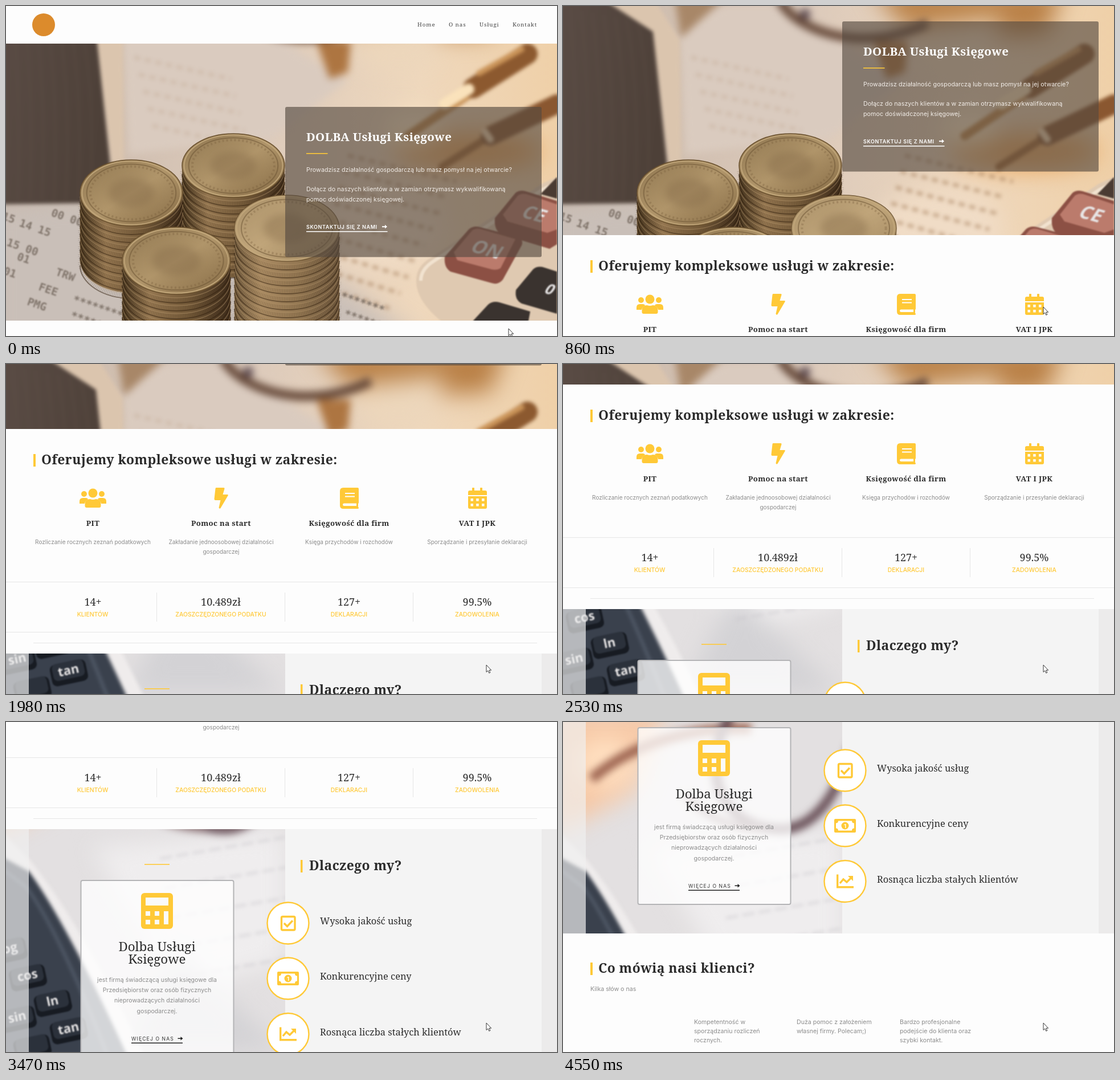
These frames come from a looping animation (967 px wide and 579 px high, 4790 ms). An HTML page:

```html
<!DOCTYPE html>
<html lang="pl">
<head>
<meta charset="utf-8">
<title>Usługi Księgowe</title>
<style>
  html, body { margin: 0; width: 100%; height: 100%; overflow: hidden; background: #fdfdfd; }
  #stage { position: relative; width: 967px; height: 579px; overflow: hidden; --s: 0; }
  #stage svg { position: absolute; left: 0; top: 0; display: block; }
  #page { position: absolute; inset: 0 0 auto; height: 1640px; transform: translateY(calc(var(--s) * -1px)); }
  #why { position: absolute; top: 946px; width: 967px; height: 451px; overflow: hidden; background: #e6e3e3; }
  #why svg { transform: translateY(calc(var(--s) * 1px - 946px)); will-change: transform; }
  #hero { will-change: transform; }
  .b1 { filter: blur(1px); }
  .b3 { filter: blur(3px); }
  .b7 { filter: blur(7px); }
  .b20 { filter: blur(20px); }
  text { font-family: Inter, "Open Sans", sans-serif; font-size: 10.6px; fill: #8c8c8c; }
  .serif, .nav, .h2, .h3, .num, .why { font-family: "Noto Serif", "Liberation Serif", serif; fill: #2b2b2b; }
  .nav { font-size: 9.8px; letter-spacing: .9px; fill: #444; }
  .h1 { font: bold 20.5px "Noto Serif", serif; letter-spacing: .4px; fill: #fff; }
  .h2 { font-size: 22.9px; font-weight: bold; letter-spacing: .45px; }
  .h3 { font-size: 13.2px; font-weight: bold; letter-spacing: .35px; }
  .num { font-size: 18px; }
  .why { font-size: 16.4px; }
  .name { font-size: 22.4px; }
  .lead { font-size: 10.7px; letter-spacing: .07px; fill: #f1ece7; }
  .desc { font-size: 10px; }
  .label { font-size: 10.4px; font-weight: 500; fill: #ffc937; }
  .cta { font-size: 9px; font-weight: 600; letter-spacing: .6px; fill: #fff; }
  .more { font-size: 8.6px; letter-spacing: 1.1px; fill: #333; }
  .mid { text-anchor: middle; }
  .y { fill: #ffc937; }
  .w { fill: #fdfdfd; }
  .ys { fill: none; stroke: #ffc937; stroke-width: 3.4; }
  .rule { stroke: #e6e6e6; }
  .print text { font: bold 19px "DejaVu Sans Mono", monospace; fill: #75695f; }
  .key { font: bold 22px "Open Sans", sans-serif; fill: #e8e6e6; text-anchor: middle; }
</style>
</head>
<body>
<div id="stage">

<svg id="hero" width="967" height="579" viewBox="0 0 967 579">
  <defs>
    <linearGradient id="desk">
      <stop offset="0" stop-color="#c8b7a9"/><stop offset=".45" stop-color="#dccabb"/>
      <stop offset=".75" stop-color="#efd8bd"/><stop offset="1" stop-color="#efd0a8"/>
    </linearGradient>
    <linearGradient id="side">
      <stop offset="0" stop-color="#46351f"/><stop offset=".25" stop-color="#947650"/>
      <stop offset=".6" stop-color="#745a39"/><stop offset="1" stop-color="#3d2b1a"/>
    </linearGradient>
    <linearGradient id="gold" x2="1" y2="1">
      <stop offset="0" stop-color="#8f7650"/><stop offset=".5" stop-color="#b0956a"/><stop offset="1" stop-color="#856a44"/>
    </linearGradient>
    <linearGradient id="wood" x2="1" y2=".3">
      <stop offset="0" stop-color="#5a4c45"/><stop offset="1" stop-color="#4d4038"/>
    </linearGradient>
  </defs>
  <rect width="967" height="579" fill="url(#desk)"/>
  <g class="b20">
    <path d="M-30 350L210 330 560 470 760 609H-30Z" fill="#c9bfb8"/>
    <path d="M540 -30H880L850 50 620 60Z" fill="#b98046"/>
    <path d="M600 40L770 20 740 110 640 110Z" fill="#ecd6bb"/>
    <ellipse cx="810" cy="255" rx="130" ry="34" fill="#e9a760"/>
    <ellipse cx="715" cy="218" rx="50" ry="28" fill="#ffeccb"/>
    <ellipse cx="660" cy="390" rx="110" ry="70" fill="#f0dcc6"/>
  </g>
  <g class="b7">
    <path d="M205 52L275 0H400L520 85 600 130 470 230 215 260Z" fill="#dacbbf"/>
    <path d="M196 -15H285L207 56Z" fill="#a88768"/>
    <path d="M380 -10C420 55 540 80 640 30" fill="none" stroke="#664939" stroke-width="16"/>
    <path d="M545 62H605L600 116 568 128Z" fill="#ad7541"/>
    <circle cx="425" cy="14" r="9" fill="#55444c"/>
  </g>
  <g class="b3" fill="none" stroke-linecap="round">
    <path d="M705 228L820 150" stroke="#c28a4d" stroke-width="15"/>
    <path d="M820 144L915 84" stroke="#8c592f" stroke-width="36"/>
    <path d="M770 172L812 146" stroke="#fae2bb" stroke-width="20"/>
    <path d="M830 118L905 76" stroke="#c99358" stroke-width="10"/>
    <path d="M765 282L850 228" stroke="#a56a35" stroke-width="13"/>
    <path d="M850 228L967 172" stroke="#8a5730" stroke-width="34"/>
    <path d="M840 220l10 14" stroke="#f6d9b3" stroke-width="12"/>
  </g>
  <g id="table" class="b3" fill="none" stroke="#a98462" stroke-width="7" stroke-dasharray="11 8" opacity=".5"/>
  <g class="b3">
    <path d="M-12 -12H78L158 45 190 345 -12 348Z" fill="url(#wood)"/>
    <path d="M70 -12H160L205 60 207 280 188 300 158 45Z" fill="#dbc5ae"/>
    <path id="grain" fill="none" stroke="#66584f" opacity=".4" stroke-width="2"/>
  </g>
  <g class="print b1" id="print" opacity=".85"></g>
  <g class="b1">
    <path d="M720 485Q718 458 745 442L940 312 967 300V579H800Q722 530 720 485Z" fill="#dfc9b1"/>
    <path d="M728 482Q728 462 750 448L942 322 967 310" fill="none" stroke="#f1e2cf" stroke-width="6"/>
    <path d="M770 440L812 392Q820 385 832 388L898 405Q909 410 905 420L872 480Q864 490 852 486L780 466Q768 458 770 440Z" fill="#8c5044"/>
    <path d="M786 432L818 394Q824 389 832 391L894 409 868 460Q862 464 852 462L792 446Z" fill="#bb7b6c"/>
    <path d="M858 372L894 328Q901 322 912 325L967 342V418L954 426 868 400Q856 392 858 372Z" fill="#8c5044"/>
    <path d="M872 366L898 333Q904 328 913 330L967 348V392L950 398 880 378Z" fill="#bb7b6c"/>
    <path d="M895 498L925 462Q933 455 945 459L967 466V540L905 522Q892 515 895 498Z" fill="#3a332f"/>
    <path d="M820 552L846 524Q854 517 866 520L920 536 912 579H830Z" fill="#3a332f"/>
    <path d="M938 330L967 300V338Z" fill="#4a3b32"/>
    <text class="key" style="font-size:33px" transform="translate(838 437) rotate(16) skewX(-18)">ON</text>
    <text class="key" style="font-size:33px" transform="translate(921 375) rotate(16) skewX(-18)">CE</text>
    <text class="key" style="font-size:26px" transform="translate(950 505) rotate(16) skewX(-18)">0</text>
  </g>
  <g id="coins"></g>
</svg>

<div id="page">
  <div id="why">
    <svg width="967" height="579" viewBox="0 0 967 579">
      <rect width="967" height="579" fill="#e3e0e1"/>
      <g class="b20">
        <path d="M-20 -20H180L130 120 -20 200Z" fill="#f6c7a4"/>
        <ellipse cx="75" cy="70" rx="55" ry="45" fill="#ffdfc0"/>
        <path d="M150 220L490 190V420L300 470Z" fill="#efedee"/>
        <path d="M210 579L300 400 490 579Z" fill="#d3d2d5"/>
      </g>
      <g class="b7" fill="none">
        <path d="M50 100C120 40 210 10 330 12" stroke="#9d6450" stroke-width="18"/>
        <path d="M295 -15C235 90 280 188 385 188 445 186 485 120 508 40" stroke="#695058" stroke-width="17"/>
        <path d="M215 128C260 176 300 184 350 188" stroke="#8d7477" stroke-width="12"/>
      </g>
      <g id="sheet" class="b3" fill="none" stroke="#c5c3c8" stroke-width="5" stroke-dasharray="22 7" opacity=".4"/>
      <g class="b3">
        <path d="M-10 190L40 240Q130 350 245 590H-10Z" fill="#efecec"/>
        <path d="M-10 235L40 262Q105 350 215 590H-10Z" fill="#3a414d"/>
        <path d="M-10 255L36 290Q95 370 180 590" fill="none" stroke="#535c6a" stroke-width="5"/>
      </g>
      <g id="keys" class="b1"></g>
      <path d="M0 0H40V579H0ZM940 0H967V579H940Z" fill="#f0f0f0" opacity=".68"/>
      <rect x="490" width="450" height="579" fill="#f4f4f4"/>
    </svg>
  </div>

  <svg width="967" height="1640" viewBox="0 0 967 1640">
    <path class="w" d="M0 0H967V66H0ZM0 552H967V946H0ZM0 1397H967V1640H0Z"/>
    <circle cx="66" cy="33" r="20" fill="#dc8b2c"/>
    <text class="nav" x="722" y="35.5">Home</text>
    <text class="nav" x="777" y="35.5">O nas</text>
    <text class="nav" x="831" y="35.5">Usługi</text>
    <text class="nav" x="889" y="35.5">Kontakt</text>

    <rect x="490" y="177" width="450" height="263.5" rx="3" fill="#554a40" opacity=".63"/>
    <text class="h1" x="527" y="237">DOLBA Usługi Księgowe</text>
    <rect class="y" x="527" y="258" width="37.5" height="1.6"/>
    <text class="lead" x="527" y="291">Prowadzisz działalność gospodarczą lub masz pomysł na jej otwarcie?</text>
    <text class="lead" x="527" y="324.5">Dołącz do naszych klientów a w zamian otrzymasz wykwalifikowaną</text>
    <text class="lead" x="527" y="342.5">pomoc doświadczonej księgowej.</text>
    <text class="cta" x="527" y="390.5">SKONTAKTUJ SIĘ Z NAMI</text>
    <path d="M660 386.2h5v-2.4l4 3.4-4 3.4v-2.4h-5zM527 395h142.5v1.6H527z" fill="#fff"/>

    <rect class="y" x="48" y="596" width="4" height="22"/>
    <text class="h2" x="62" y="614">Oferujemy kompleksowe usługi w zakresie:</text>

    <g class="y">
      <circle cx="137" cy="666" r="5"/><circle cx="168" cy="666" r="5"/>
      <path d="M129 683v-4q0-6 6-6h5q3 0 4 2-5 3-6 8zM176 683v-4q0-6-6-6h-5q-3 0-4 2 5 3 6 8z"/>
      <circle cx="152.5" cy="664.5" r="8"/>
      <path d="M138.500 687v-3q0-9 9-9 5 2 10 0 9 0 9 9v3q0 3-3 3h-22q-3 0-3-3z"/>
      <path d="M369 655h13q2 0 1.500 2l-3 10h8q2 0 1 2l-13 22q-2 2-3-1l3-13h-9q-2 0-2-2l2-18q0-2 1.500-2z"/>
      <path d="M592 655h25q2 0 2 2v24q0 1.500-1 2v6q1 0 1 1.500t-2 1.500h-25q-6 0-6-6v-25q0-6 6-6z"/>
      <path d="M811 670h33v19q0 3-3 3h-27q-3 0-3-3zM811 668v-5q0-3 3-3h4v-4q0-1 1-1h2q1 0 1 1v4h10v-4q0-1 1-1h2q1 0 1 1v4h5q3 0 3 3v5z"/>
    </g>
    <path class="w" d="M595 664h17v2h-17zM595 669.500h17v2h-17zM593 682.500h22v4.500h-22q-2-.5-2-2.200t2-2.300z"/>
    <path class="w" d="M815.500 674h4.500v4.500h-4.500zM825.200 674h4.500v4.500h-4.500zM835 674h4.500v4.500h-4.500zM815.500 683h4.500v4.500h-4.500zM825.200 683h4.500v4.500h-4.500zM835 683h4.500v4.500h-4.500z"/>

    <g class="mid">
      <text class="h3" x="152.500" y="721.500">PIT</text>
      <text class="h3" x="377.500" y="721.500">Pomoc na start</text>
      <text class="h3" x="602" y="721.500">Księgowość dla firm</text>
      <text class="h3" x="827" y="721.500">VAT I JPK</text>
      <text class="desc" x="152.500" y="753.500">Rozliczanie rocznych zeznań podatkowych</text>
      <text class="desc" x="377.500" y="753.500">Zakładanie jednoosobowej działalności</text>
      <text class="desc" x="377.500" y="770.500">gospodarczej</text>
      <text class="desc" x="602" y="753.500">Księga przychodów i rozchodów</text>
      <text class="desc" x="827" y="753.500">Sporządzanie i przesyłanie deklaracji</text>
      <text class="num" x="152.500" y="862">14+</text>
      <text class="num" x="377" y="862">10.489zł</text>
      <text class="num" x="602" y="862">127+</text>
      <text class="num" x="827" y="862">99.5%</text>
      <text class="label" x="152" y="881">KLIENTÓW</text>
      <text class="label" x="377" y="881">ZAOSZCZĘDZONEGO PODATKU</text>
      <text class="label" x="602" y="881">DEKLARACJI</text>
      <text class="label" x="827" y="881">ZADOWOLENIA</text>
    </g>
    <path class="rule" d="M0 820.500H967M0 908.500H967M48 927.500H932M264.500 839V890M489.500 839V890M714.500 839V890"/>

    <rect class="y" x="243" y="1007" width="44" height="1.600"/>
    <rect x="131.500" y="1036" width="268" height="310" rx="3" fill="#fff" fill-opacity=".78" stroke="#b4b4b6" stroke-width="2"/>
    <rect class="y" x="237" y="1058" width="56" height="63" rx="6"/>
    <path fill="#fafafa" d="M245 1066h40v14h-40zM245 1090h8v8h-8zM261 1090h8v8h-8zM245 1105h8v8h-8zM261 1105h8v8h-8zM277 1090h8v23h-8z"/>
    <g class="mid">
      <text class="serif name" x="265" y="1160">Dolba Usługi</text>
      <text class="serif name" x="265" y="1182">Księgowe</text>
      <text x="265" y="1213.500">jest firmą świadczącą usługi księgowe dla</text>
      <text x="265" y="1232">Przedsiębiorstw oraz osób fizycznych</text>
      <text x="265" y="1250.300">nieprowadzących działalności</text>
      <text x="265" y="1268.700">gospodarczej.</text>
    </g>
    <text class="more" x="220" y="1316.500">WIĘCEJ O NAS</text>
    <path d="M301.500 1312.500h5v-2.400l4 3.200-4 3.200v-2.400h-5zM220 1320.500h90v1.500h-90z" fill="#222"/>

    <rect class="y" x="517" y="1000" width="3.500" height="22"/>
    <text class="h2" x="532" y="1018">Dlaczego my?</text>
    <g fill="#fff" stroke="#ffc937" stroke-width="2.400">
      <circle cx="495" cy="1111" r="36.500"/><circle cx="495" cy="1208" r="36.500"/><circle cx="495" cy="1305.500" r="36.500"/>
    </g>
    <rect class="ys" x="483.500" y="1099.500" width="23.500" height="23.500" rx="2"/>
    <path class="ys" d="M488 1111l5.500 5.500 9.500-10"/>
    <rect class="y" x="476" y="1196" width="38" height="24" rx="2"/>
    <path fill="#fff" d="M483 1199.500h24q0 4 4 4v9q-4 0-4 4h-24q0-4-4-4v-9q4 0 4-4z"/>
    <circle class="y" cx="495" cy="1208" r="6.500"/>
    <text class="mid" x="495" y="1211.500" style="fill:#fff;font-weight:bold;font-size:9.500px">1</text>
    <path class="ys" d="M481.700 1293.500v22.200H510M486 1309l6-7 6 5 8-8"/>
    <path class="y" d="M500 1296h9v9z"/>
    <text class="why" x="551" y="1113">Wysoka jakość usług</text>
    <text class="why" x="551" y="1210">Konkurencyjne ceny</text>
    <text class="why" x="551" y="1307.500">Rosnąca liczba stałych klientów</text>

    <rect class="y" x="48" y="1448" width="4" height="22"/>
    <text class="h2" x="62" y="1466">Co mówią nasi klienci?</text>
    <text x="48" y="1497.500">Kilka słów o nas</text>
    <text x="230" y="1555.500">Kompetentność w</text>
    <text x="230" y="1572">sporządzaniu rozliczeń</text>
    <text x="230" y="1588">rocznych.</text>
    <text x="410" y="1555.500">Duża pomoc z założeniem</text>
    <text x="410" y="1572">własnej firmy. Polecam;)</text>
    <text x="591" y="1555.500">Bardzo profesjonalne</text>
    <text x="591" y="1572">podejście do klienta oraz</text>
    <text x="591" y="1588">szybki kontakt.</text>
  </svg>
</div>

<svg id="cursor" width="12" height="18" viewBox="-1 -1 12 18">
  <path d="M0 0V12.500L2.800 10 4.800 14.300 6.800 13.400 4.900 9.200H8.600Z" fill="#fff" stroke="#222" stroke-width=".9"/>
</svg>
</div>

<script>
const $ = id => document.getElementById(id);
const range = (n, fn) => Array.from({ length: n }, (_, i) => fn(i)).join('');
const path = (d, attrs = '') => `<path d="${d}" ${attrs}/>`;

// Stack of coins: milled side, edges, then the top face
function stack(cx, cy, rx, ry, bottom, tint = 0) {
  const x = cx - rx;
  const arc = y => `M${x} ${y}a${rx} ${ry} 0 0 0 ${2 * rx} 0`;
  const edges = range(Math.ceil((bottom - cy) / 14), i => {
    const y = cy + 6 + i * 14;
    return path(arc(y + 4), 'stroke="#3a2816" stroke-width="7" stroke-dasharray="1 2" opacity=".18"')
      + path(arc(y), 'stroke="#b4966a" stroke-width="1.4" opacity=".45"')
      + path(arc(y + 9), 'stroke="#33210f" stroke-width="2" opacity=".5"');
  });
  const face = (k, attrs) => `<ellipse cx="${cx}" cy="${cy}" rx="${rx * k}" ry="${ry * k}" ${attrs}/>`;
  const body = `M${x} ${cy}V${bottom}a${rx} ${ry} 0 0 0 ${2 * rx} 0V${cy}Z`;
  return path(body, 'fill="url(#side)"') + path(body, `fill="#d9b98a" opacity="${tint}"`)
    + `<g fill="none">${edges}</g>`
    + face(1, 'fill="url(#gold)" stroke="#6a512f" stroke-width="1.5"')
    + face(1, `fill="#e3cba0" opacity="${tint}"`)
    + face(.96, 'fill="none" stroke="#c3a87b" stroke-width="1.6"')
    + face(.87, 'fill="none" stroke="#6b5232" stroke-width="2" opacity=".5"')
    + face(.8, 'fill="none" stroke="#75593a" stroke-width="4" stroke-dasharray="3 4" opacity=".3"')
    + face(.45, 'class="b7" fill="#7a6040" opacity=".35"');
}

$('coins').innerHTML = stack(399, 280, 90, 56, 420) + stack(220, 328, 90, 58, 445)
  + stack(493, 390, 92, 58, 560, .3) + stack(299, 447, 95, 59, 580);

$('grain').setAttribute('d', range(8, i => `M${i * 20 - 8} ${i * 4}Q${i * 22 + 5} 170 ${i * 21} 340`));
$('table').innerHTML = range(9, i => path(`M${600 - i * 8} ${262 + i * 28}l${190 - i * 6} 46`))
  + range(5, i => path(`M${225 + i * 8} ${90 + i * 30}l170 38`, 'opacity=".3"'));
$('sheet').innerHTML = range(5, i => path(`M${270 + i * 8} ${240 + i * 52}l220 -38`));

const prints = [[78, 368, '00 00'], [22, 386, '14 15'], [-8, 374, '15'], [0, 420, '15 00'], [18, 445, '01'],
  [86, 472, 'TRW'], [56, 498, 'FEE'], [36, 524, 'PMG'], [116, 520, '********'], [112, 548, '********'],
  [586, 514, '*******'], [592, 545, '********'], [-6, 470, '01']];
$('print').innerHTML = prints.map(([x, y, s]) => `<text transform="translate(${x} ${y}) rotate(19)">${s}</text>`).join('');

const calcKeys = [[4, 400, 'log'], [38, 447, 'cos'], [82, 492, 'ln'], [110, 540, 'tan'], [20, 520, 'sin'], [46, 570, '']];
$('keys').innerHTML = calcKeys.map(([x, y, s]) => `<g transform="translate(${x} ${y}) rotate(-12)">
  <rect x="-32" y="-17" width="64" height="38" rx="9" fill="#171b22"/>
  <rect x="-28" y="-18" width="56" height="30" rx="8" fill="#2b313b"/>
  <text class="key" y="5">${s}</text></g>`).join('');

const LOOP = 4790;
// Stepped scrolling: start, end, number of steps
const bursts = [[80, 710, 9], [860, 1350, 7], [1510, 2530, 14], [2700, 3090, 6], [3230, 4550, 18]];
// Scroll offset at points in time
const track = [[0, 0], [80, 4], [160, 18], [320, 68], [470, 112], [630, 144], [710, 148], [860, 150], [940, 174],
  [1110, 254], [1190, 285], [1270, 293], [1350, 295], [1510, 298], [1590, 318], [1750, 378], [1900, 430],
  [1980, 438], [2060, 442], [2140, 450], [2290, 486], [2450, 513], [2530, 516], [2700, 520], [2780, 542],
  [2940, 628], [3010, 652], [3090, 663], [3230, 667], [3310, 687], [3390, 722], [3460, 758], [3620, 802],
  [3780, 840], [3940, 885], [4260, 970], [4550, 1026]];

function snap(t) {
  let at = 0;
  for (const [a, b, n] of bursts) {
    if (t < a) break;
    const step = (b - a) / (n - 1);
    at = a + Math.min(n - 1, Math.floor((t - a + 4) / step)) * step;
  }
  return Math.round(at / 10) * 10;
}

function scrollAt(t) {
  const i = track.findIndex(p => p[0] >= t);
  if (i < 1) return i ? track.at(-1)[1] : 0;
  const [[t0, s0], [t1, s1]] = [track[i - 1], track[i]];
  return Math.round(s0 + (s1 - s0) * (t - t0) / (t1 - t0));
}

function draw(now) {
  const t = snap(now % LOOP);
  const k = Math.min(1, t / 550);
  $('stage').style.setProperty('--s', scrollAt(t));
  $('cursor').style.transform = `translate(${Math.round(881 - 39 * k)}px, ${Math.round(565 - 38 * k)}px)`;
}

const start = performance.now();
function tick() {
  draw(performance.now() - start);
  requestAnimationFrame(tick);
}
tick();
</script>
</body>
</html>
```
